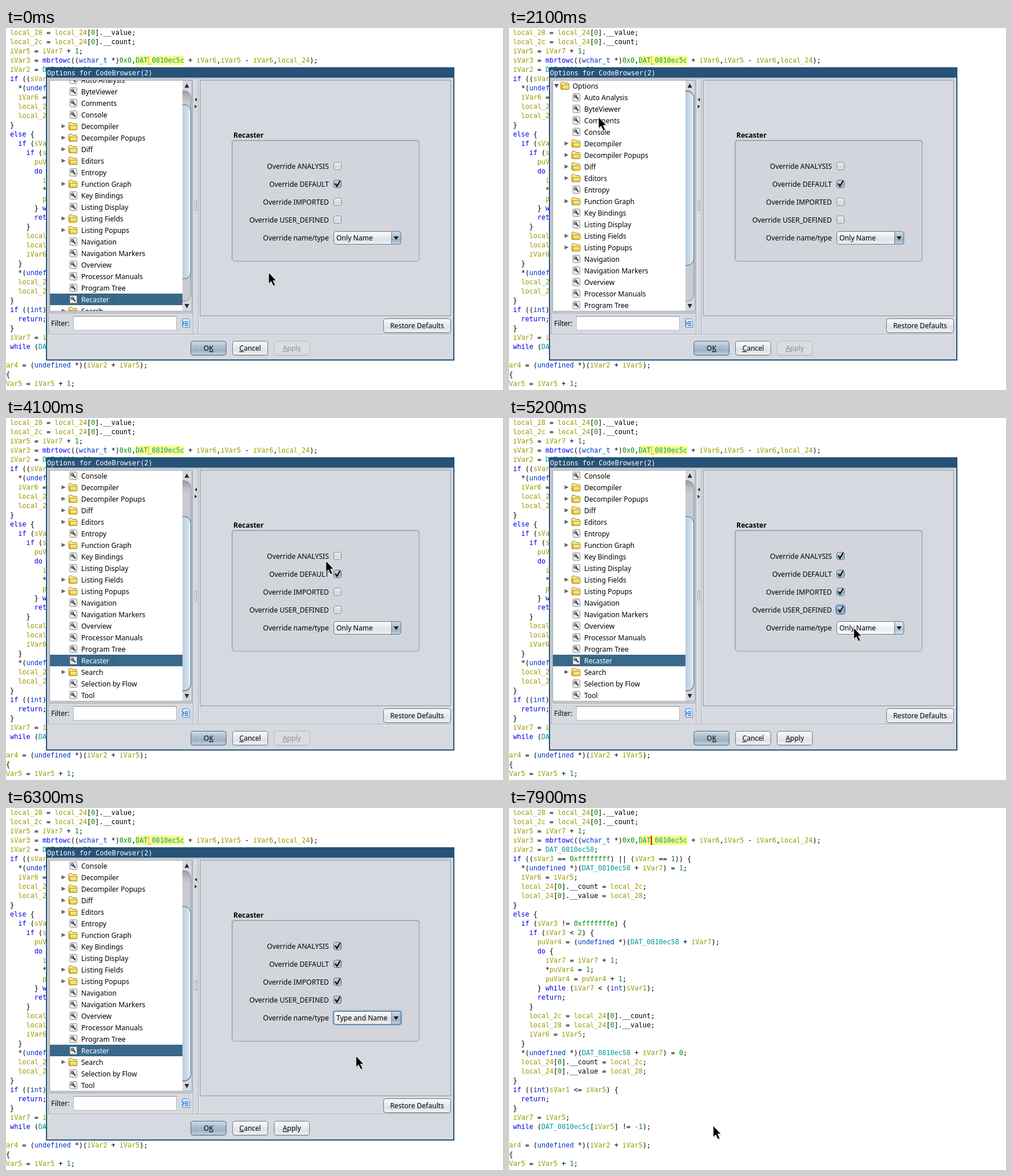
An HTML page that plays this animation: 859x627 px, repeating every 8 s.

```html
<!DOCTYPE html>
<html lang="en">
<head>
<meta charset="utf-8">
<title>Options dialog</title>
<style>
html, body { margin: 0; width: 100%; height: 100%; overflow: hidden; background: #fff; }
#stage { position: absolute; left: 0; top: 0; width: 859px; height: 627px; overflow: hidden; background: #fff; }
pre { position: absolute; left: 0; top: 0; margin: 0; color: #000; }
pre, .mono { font: 11.63px/16px "DejaVu Sans Mono", monospace; }
.kw { color: #0001e6; } .fn { color: #00f; } .ty { color: #03c; }
.va { color: #990; } .gl { color: #099; } .nu { color: #008e00; }
#mark { position: absolute; left: 224px; top: 48px; width: 84px; height: 16px; background: #ffff7f; }
#caret { position: absolute; top: 48px; height: 16px; }
svg { position: absolute; left: 0; top: 0; }
svg text { font: 12px "Noto Sans", sans-serif; white-space: pre; }
svg text.mono { font: 11.63px "DejaVu Sans Mono", monospace; }
svg text.bold { font-weight: 700; }
</style>
</head>
<body>
<div id="stage">
  <div id="mark"></div>
  <pre id="code"></pre>
  <div id="caret"></div>
  <svg id="ui" width="859" height="627" viewBox="0 0 859 627"></svg>
</div>
<script>
const LOOP = 8000, STEP = 100;
const $ = id => document.getElementById(id);

// ---- code listing ----
const code = ` local_28 = local_24[0].__value;
 local_2c = local_24[0].__count;
 iVar5 = iVar7 + 1;
 sVar3 = mbrtowc((wchar_t *)0x0,DAT_0810ec5c + iVar6,iVar5 - iVar6,local_24);
 iVar2 = DAT_0810ec58;
 if ((sVar3 == 0xffffffff) || (sVar3 == 1)) {
   *(undefined *)(DAT_0810ec58 + iVar7) = 1;
   iVar6 = iVar5;
   local_24[0].__count = local_2c;
   local_24[0].__value = local_28;
 }
 else {
   if (sVar3 != 0xfffffffe) {
     if (sVar3 < 2) {
       puVar4 = (undefined *)(DAT_0810ec58 + iVar7);
       do {
         iVar7 = iVar7 + 1;
         *puVar4 = 1;
         puVar4 = puVar4 + 1;
       } while (iVar7 < (int)sVar1);
       return;
     }
     local_2c = local_24[0].__count;
     local_28 = local_24[0].__value;
     iVar6 = iVar5;
   }
   *(undefined *)(DAT_0810ec58 + iVar7) = 0;
   local_24[0].__count = local_2c;
   local_24[0].__value = local_28;
 }
 if ((int)sVar1 <= iVar5) {
   return;
 }
 iVar7 = iVar5;
 while (DAT_0810ec5c[iVar5] != -1);

ar4 = (undefined *)(iVar2 + iVar5);
{
Var5 = iVar5 + 1;`;
const esc = s => s.replace(/&/g, '&amp;').replace(/</g, '&lt;');
const kinds = [
  ['kw', /^(if|else|do|while|return)$/], ['ty', /^(wchar_t|undefined|int)$/], ['fn', /^mbrtowc$/],
  ['gl', /^DAT_/], ['va', /^(local_|\w*ar\d)/], ['nu', /^-?\d/]
];
$('code').innerHTML = code.replace(/-?\w+|[^\w-]+|-/g, tok => {
  const kind = kinds.find(k => k[1].test(tok));
  return kind ? `<span class="${kind[0]}">${tok}</span>` : esc(tok);
});

// ---- drawing helpers ----
const rect = (x, y, w, h, fill, stroke, rx = 0, more = '') =>
  `<rect x="${x}" y="${y}" width="${w}" height="${h}" rx="${rx}" fill="${fill}" stroke="${stroke || 'none'}" ${more}/>`;
const path = (d, fill, stroke, w = 1) =>
  `<path d="${d}" fill="${fill}" stroke="${stroke || 'none'}" stroke-width="${w}"/>`;
const text = (x, y, s, fill = '#000', anchor = 'start', cls = '') =>
  `<text x="${x}" y="${y}" fill="${fill}" text-anchor="${anchor}" class="${cls}">${s}</text>`;
const grad = (id, colors, size = 'x2="0" y2="1"') =>
  `<linearGradient id="${id}" ${size}>` +
  colors.map((c, i) => `<stop offset="${i / (colors.length - 1)}" stop-color="${c}"/>`).join('') + '</linearGradient>';

const defs = '<defs>' +
  grad('btn', ['#fcfcfd', '#eceef1', '#dfe2e6', '#f2f4f7']) +
  grad('box', ['#f0f1f4', '#dfe2e7', '#d6d9df', '#e6e9ee']) +
  grad('hot', ['#ffffff', '#f4f6fa', '#eaedf3', '#ffffff']) +
  grad('blue', ['#d5e0e9', '#b1c2d1', '#9cb1c3', '#c3d6e6']) +
  grad('blueHot', ['#e8f0f7', '#c3d3e1', '#b1c5d7', '#d8e8f5']) +
  grad('down', ['#4a6d8c', '#3f6788', '#3a6284', '#5d86a6']) +
  grad('thumb', ['#dce7f0', '#b9ccdc', '#c8d9e7', '#e3eef7'], 'x2="1" y2="0"') +
  grad('track', ['#93969c', '#b7babf', '#c8cbd1'], 'x2="0" y2=".06"') +
  grad('folder', ['#fff6a8', '#e8c53a']) +
  '<clipPath id="list"><rect x="76" y="91" width="229" height="399"/></clipPath>' +
  '<clipPath id="bar"><rect x="305" y="91" width="16" height="399"/></clipPath></defs>';

function button(x, y, w, label, fill = 'url(#btn)', ink = '#000', edge = '#70757f') {
  return rect(x + .5, y + 1.5, w - 1, 24, 'none', '#bfc3ca', 4) +
    rect(x + .5, y + .5, w - 1, 24, fill, edge, 4) +
    text(x + w / 2, y + 17, label, ink, 'middle');
}
const key = c => `<tspan text-decoration="underline">${c}</tspan>`;

function checkbox(y, on, focus, hot) {
  const fill = on ? (hot ? 'url(#blueHot)' : 'url(#blue)') : (hot ? 'url(#hot)' : 'url(#box)');
  return (focus ? rect(565, y - 8, 16, 16, 'none', '#73a4d1', 4, 'stroke-width="2"') : '') +
    rect(566.5, y - 6.5, 13, 13, fill, on ? '#4a6780' : '#868b95', 3) +
    (on ? path(`M569 ${y - .5}l3 4.5l5.500 -9.500`, 'none', '#000', 2) : '');
}

// ---- options tree ----
const rows = ('-Options,Auto Analysis,ByteViewer,Comments,Console,+Decompiler,+Decompiler Popups,+Diff,+Editors,' +
  'Entropy,+Function Graph,Key Bindings,Listing Display,+Listing Fields,+Listing Popups,Navigation,' +
  'Navigation Markers,Overview,Processor Manuals,Program Tree,Recaster,+Search,Selection by Flow,Tool').split(',');

const folder = (x, y) =>
  path(`M${x + .5} ${y - 4.5}q0 -2 2 -2h3l2 2h5q2 0 2 2v7q0 2 -2 2h-10q-2 0 -2 -2z`, 'url(#folder)', '#9c7a10') +
  path(`M${x + 2.5} ${y + 5}v-6h12.5v5.5q0 2 -2 2h-10z`, 'url(#folder)', '#a98712');
const page = (x, y) =>
  rect(x + .5, y - 6.5, 12, 13, '#eeeeee', '#8a8a8a', 1) +
  path(`M${x + 5} ${y - 2}l5 5.5`, 'none', '#333', 2) +
  `<circle cx="${x + 4.7}" cy="${y - 1.8}" r="2.1" fill="none" stroke="#444" stroke-width="1.3"/>`;

// y is the middle of the row
function treeRow(name, i) {
  const y = 100 + i * 20, sign = name[0], label = name.replace(/^[-+]/, '');
  const picked = label === 'Recaster';
  let out = picked ? rect(76, y - 10, 229, 20, '#39698a') +
    rect(128.5, y - 9.5, 58, 19, 'none', '#2c5674', 0, 'id="cell"') : '';
  if (sign === '-') return path(`M78 ${y - 3}h8l-4 7z`, '#555') + folder(89, y) + text(110, y + 5, label);
  if (sign === '+') out += path(`M96 ${y - 3.5}l7 3.5l-7 3.5z`, '#666') + folder(108, y);
  else out += page(110, y);
  return out + text(130, y + 5, label, picked ? '#fff' : '#000');
}

// ---- fixed parts of the dialog ----
const bg = '#d6d9df', edge = '#9297a1';
const frame =
  rect(69, 68, 706, 508, '#265377') + rect(71, 86, 702, 488, bg) +
  text(71, 82, 'Options for CodeBrowser(2)', '#fff', 'start', 'mono') +
  path('M73 87.5h697M73.5 87v443M73 530.5h697M323.5 88v442M332.5 88v442', 'none', '#a6abb4') +
  path('M73 531.5h698M324.5 88v442M333.5 88v442', 'none', '#eef0f3') +
  rect(75.5, 90.5, 246, 400, '#fff', edge) + rect(305, 91, 16, 399, bg) +
  path('M75 493.5h248', 'none', edge) +
  path('M308.500 103.500h8l-4 -7.500zM308.500 478h8l-4 7.500zM330 121v6l-4 -3zM326 133v6l4 -3z', '#2b2b2b') +
  rect(326.5, 299.5, 3, 16, '#e6e8ec', '#9ba0a9') +
  rect(335.5, 90.5, 433, 408, bg, edge) +
  text(78, 516, 'Filter:') + rect(116.5, 499.5, 178, 24, '#fff', '#b7bbc2') + path('M116 499.5h179', 'none', '#8d9199') +
  path('M305.5 503.5h9l3 3v12h-12z', '#d7e8fb', '#4f8fd0') +
  path('M304 508l4 3.5l-4 3.5M309 509h6M309 512h6M309 515h6', 'none', '#2d78c8', 1.4) +
  text(393, 190, 'Recaster', '#000', 'start', 'bold') +
  rect(391, 195, 323, 209, '#d2d5db', '#b3b6bc', 5, 'stroke-width="2"') +
  path('M390.5 400V199q0 -4.500 4 -4.500h316q4 0 4 4', 'none', '#9a9da3') +
  ['ANALYSIS', 'DEFAULT', 'IMPORTED', 'USER_DEFINED', 'name/type']
    .map((s, i) => text(558, 244 + i * 31, 'Override ' + s, '#000', 'end')).join('') +
  button(652, 503, 117, 'Restore Defaults') +
  button(391, 542, 62, key('C') + 'ancel');

$('ui').innerHTML = defs + '<g id="dialog">' + frame +
  `<g clip-path="url(#list)"><g id="tree">${rows.map(treeRow).join('')}</g></g>` +
  '<g clip-path="url(#bar)">' + rect(295.5, 108.5, 24, 365, 'url(#track)', '#8e9299', 12) +
  rect(295.5, 110.5, 24, 302, 'url(#thumb)', '#3f6483', 12, 'id="grip"') + '</g>' +
  '<g id="controls"></g></g><g id="pointer">' +
  '<path d="M2 2v21l4.500 -4l3.500 7.500l4 -2l-3.500 -7h6z" fill="#000" opacity=".18"/>' +
  '<path d="M.8 .8v20.500l4.400 -4l3.700 7.700l3.800 -1.800l-3.700 -7.400h6z" fill="#000" stroke="#fff" stroke-width="1.100"/></g>';

// ---- motion: time, x, y of the pointer ----
const track = [
  [0, 453, 422], [600, 570, 238], [900, 570, 238], [1600, 179, 453], [1800, 177, 443],
  [2200, 150, 99], [2300, 150, 99], [2400, 156, 196], [2700, 156, 196], [2800, 162, 396],
  [3000, 162, 396], [3100, 160, 420], [3400, 160, 420], [4200, 570, 238], [4300, 570, 238],
  [4600, 571, 300], [4700, 571, 300], [4900, 571, 331], [5000, 571, 331], [5200, 595, 362],
  [5500, 595, 362], [6000, 604, 428], [6300, 604, 428], [6900, 352, 549], [LOOP, 352, 549]
];
function pointerAt(t) {
  const i = track.findIndex(k => k[0] > t), a = track[i - 1], b = track[i];
  const p = (t - a[0]) / (b[0] - a[0]), e = p * p * (3 - 2 * p);
  return [1, 2].map(n => Math.round(a[n] + (b[n] - a[n]) * e));
}

const choices = ['Only Name', 'Only Type', 'Type and Name'];
const clicks = [4300, 0, 4700, 5000];

function controls(t, x, y) {
  const over = (l, tp, w, h) => x >= l && x < l + w && y >= tp && y < tp + h;
  const focus = t < 4300 ? -1 : t < 4700 ? 0 : t < 5000 ? 2 : t < 5300 ? 3 : 4;
  let out = clicks.map((at, i) => {
    const cy = 239 + i * 31;
    return checkbox(cy, t >= at, focus === i, over(566, cy - 7, 15, 15));
  }).join('');

  const hot = over(566, 352, 117, 23);
  if (focus === 4) out += rect(565.5, 351.5, 118, 24, 'none', '#73a4d1', 4, 'stroke-width="2"');
  out += rect(566.5, 352.5, 116, 22, hot ? 'url(#hot)' : 'url(#btn)', '#70757f', 4) +
    path('M666.5 352.5h12q4 0 4 4v14q0 4 -4 4h-12z', hot ? 'url(#blueHot)' : 'url(#blue)', '#5f7b94') +
    path('M670 361h8.500l-4.250 6z', '#111') + text(571, 368, choices[t < 6300 ? 0 : 2]);

  const pressed = t >= 7800, okHot = over(319, 542, 62, 25);
  out += button(319, 542, 62, 'O' + key('K'), pressed ? 'url(#down)' : okHot ? 'url(#blueHot)' : 'url(#blue)',
    pressed ? '#fff' : '#000', pressed ? '#223c52' : '#4d6780');
  out += t < 4300 ? button(463, 542, 62, key('A') + 'pply', '#dadde2', '#8e8f91', '#b9bdc4')
    : button(463, 542, 62, key('A') + 'pply');

  if (t >= 5300 && t < 6300) {
    const pick = y < 399 ? 0 : y < 420 ? 1 : 2;
    out += rect(566.5, 376.5, 116, 65, '#fff', '#6b7079') + choices.map((s, i) =>
      (i === pick ? rect(567, 378 + i * 21, 115, 21, '#39698a') : '') +
      text(571, 393 + i * 21, s, i === pick ? '#fff' : '#000')).join('');
  }
  return out;
}

let last = -1;
function draw(now) {
  const t = Math.floor(now % LOOP / STEP) * STEP;
  if (t === last) return;
  last = t;
  const [x, y] = pointerAt(t), open = t < 7900;
  const scroll = t < 1800 ? 30 : t < 2800 ? 0 : 80;
  $('pointer').setAttribute('transform', `translate(${x} ${y})`);
  $('dialog').style.display = open ? '' : 'none';
  $('tree').setAttribute('transform', `translate(0 ${-scroll})`);
  $('grip').setAttribute('y', Math.round(110 + scroll * .76) - .5);
  $('cell').style.display = t < 4300 ? '' : 'none';
  $('controls').innerHTML = controls(t, x, y);
  const caret = $('caret').style;
  caret.left = open ? '246px' : '245px';
  caret.width = open ? '1px' : '2px';
  caret.background = open ? '#ff9a70' : '#f00';
}
const start = performance.now();
function loop() {
  draw(performance.now() - start);
  requestAnimationFrame(loop);
}
loop();
</script>
</body>
</html>
```
